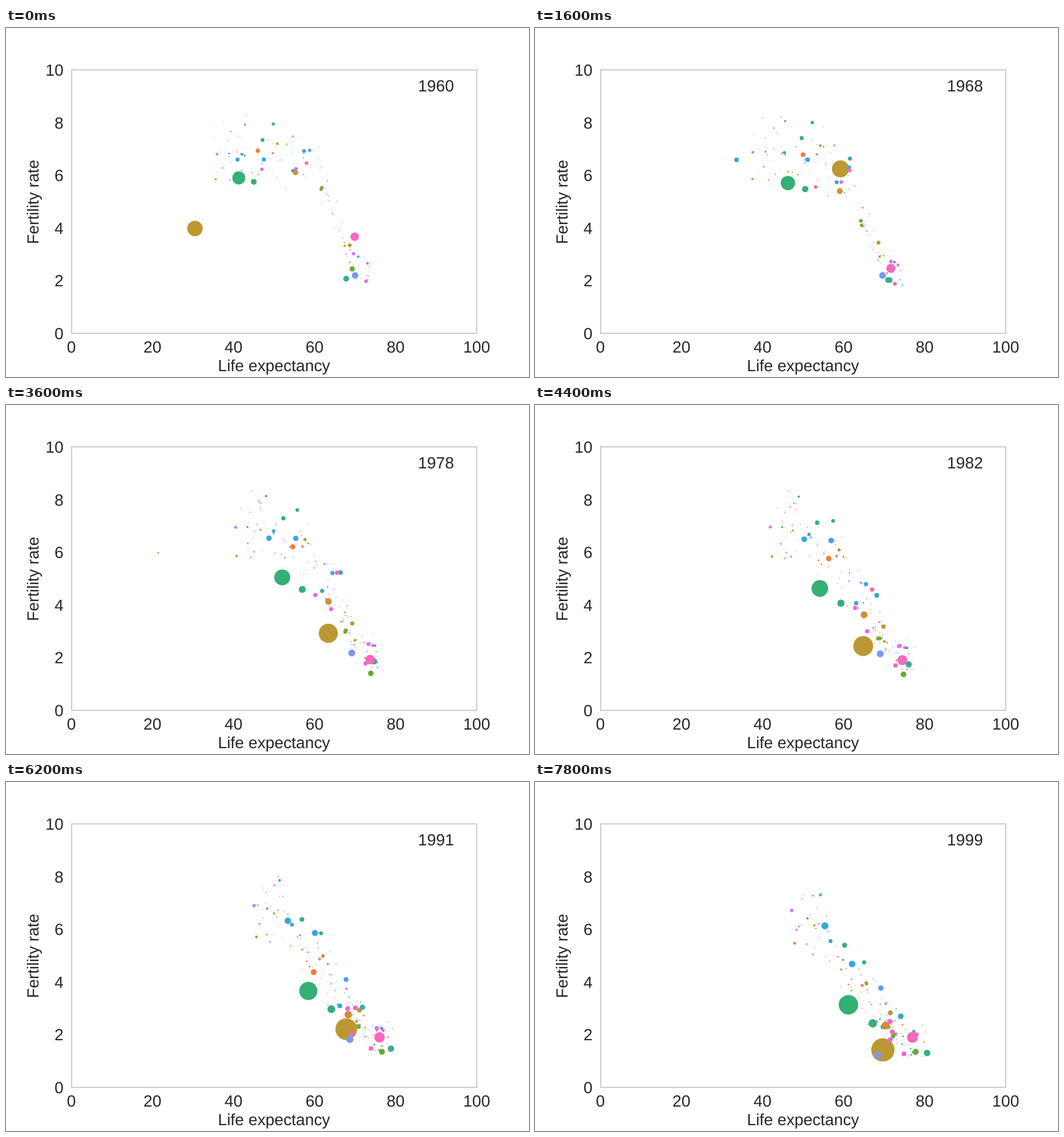
An HTML page that plays this animation: 900x600 px, repeating every 8 s.

```html
<!DOCTYPE html>
<html lang="en">
<head>
<meta charset="utf-8">
<title>Life expectancy and fertility rate</title>
<style>
  html, body { margin: 0; width: 100%; height: 100%; overflow: hidden; background: #fff; }
  svg { display: block; width: 900px; height: 600px; }
  text {
    font: 27.78px "Liberation Sans", Arial, sans-serif;
    fill: #262626;
    text-anchor: middle;
    text-rendering: geometricPrecision;
  }
  .y-tick { text-anchor: end; }
</style>
</head>
<body>
<svg viewBox="0 0 900 600">
  <g id="dots"></g>
  <rect x="113" y="72" width="697" height="453" fill="none" stroke="#ccc" stroke-width="2"/>
  <g id="ticks"></g>
  <text x="461.2" y="590">Life expectancy</text>
  <text transform="translate(56 299) rotate(-90)">Fertility rate</text>
  <text id="year" x="740" y="109">1960</text>
</svg>
<script>
const FIRST_YEAR = 1960, YEARS = 40, STEP = 200;
const PALETTE = ['#f77189', '#ee7f32', '#dc8932', '#c39532', '#ae9d31', '#77ab31', '#33b07a',
  '#35ae93', '#36ada4', '#38a9c5', '#3aa3ea', '#6e9bf4', '#a48cf4', '#cc7af4', '#f45deb', '#f565cc', '#f66bad'];
const dots = [];

const px = life => 112.5 + 6.975 * life;
const py = rate => 525 - 45.3 * rate;
const mix = (a, b, k) => a + (b - a) * k;
const fall = (x, middle, width) => 1 / (1 + Math.exp((x - middle) / width));
const bump = (x, middle, width) => Math.exp(-(((x - middle) / width) ** 2));
const progress = year => year / (YEARS - 1);

function make(parent, tag, attrs, label = '') {
  const node = document.createElementNS('http://www.w3.org/2000/svg', tag);
  for (const name in attrs) node.setAttribute(name, attrs[name]);
  node.textContent = label;
  return document.getElementById(parent).appendChild(node);
}

// place(year) returns [life expectancy, fertility rate]
function addDot(color, radius, growth, place) {
  dots.push({ node: make('dots', 'circle', { fill: color }), radius, growth, place });
}

// Life rises along an ease-out, fertility drops along an S-curve; events bend both for a while
function addCountry(color, radius, [life0, life1], [high, low, middle, width = 7], ...events) {
  const growth = 0.9 + 0.0675 * (high + low);
  addDot(color, radius, growth, year => {
    let life = mix(life0, life1, 1 - (1 - progress(year)) ** 1.25);
    let rate = mix(low, high, fall(year, middle, width));
    for (const { at, span, life: dLife = 0, rate: dRate = 0 } of events) {
      const strength = bump(year, at, span);
      life += dLife * strength;
      rate += dRate * strength;
    }
    return [life, rate];
  });
}

let seed = 1973;
function random() {
  seed = (seed * 16807) % 2147483647;
  return seed / 2147483647;
}

// Fertility by life expectancy: a steep S-curve that flattens out over the decades
function typicalRate(life, k) {
  const drop = fall(life, mix(65, 63, k), mix(2.3, 6.3, k));
  return mix(mix(2.3, 1.2, k), mix(6.75, 7.1, k), drop);
}

function addSmallDots(count) {
  for (let i = 0; i < count; i++) {
    const start = random() < 0.66 ? 35 + 28 * random() : 62 + 12 * random();
    const gain = 4.5 + 9 * fall(start, 62, 4) + 7 * (random() - 0.5);
    const spread = random() + random() - 1, phase = 2 * Math.PI * random();
    const radius = 0.6 + 2.6 * random() ** 3.5;
    const color = PALETTE[Math.floor(i / count * PALETTE.length)];
    addDot(color, radius, 1.35, year => {
      const k = progress(year);
      const life = start + gain * k + 0.6 * Math.sin(phase + year / 7);
      const rate = typicalRate(life, k);
      return [life, rate + spread * (mix(0.2, 0.6, k) + 0.18 * rate)];
    });
  }
}

addSmallDots(122);

addCountry('#ee8032', 3.6, [46, 62], [7, 2.4, 29]);
addCountry('#d58c32', 4.6, [55.3, 70.4], [6.8, 2, 16, 9]);
addCountry('#cb9132', 1.2, [42, 59.4], [6.2, 3.5, 35],
  { at: 17.3, span: 3.7, life: -31 });
addCountry('#bb9832', 13.3, [56, 69.7], [6.7, 2.3, 13.5, 2.5],
  { at: 0, span: 3.6, life: -25.5, rate: -2.7 },
  { at: 40, span: 6, rate: -0.9 });
addCountry('#65ad31', 4.5, [69.3, 77.8], [2.5, 1.35, 9, 3]);
addCountry('#33b074', 11.2, [41.3, 61.2], [6, 2.8, 24]);
addCountry('#34b07a', 5, [45, 67.2], [5.9, 2.1, 22.5]);
addCountry('#35ae8e', 5, [67.8, 80.6], [2.1, 1.2, 25]);
addCountry('#37abb2', 3.2, [57.4, 74.1], [7, 2.6, 20, 5]);
addCountry('#39a7d6', 3.5, [41, 55.4], [6.6, 5.9, 34],
  { at: 8, span: 2.5, life: -11 });
addCountry('#3ba3e8', 3.6, [47.5, 62.1], [6.6, 3.4, 37, 5]);
addCountry('#4d9ff3', 2.8, [58.8, 69.2], [7.6, 3.5, 15, 9]);
addCountry('#7d98f4', 5.7, [70, 68.5], [2.2, 0.9, 34.5, 4]);
addCountry('#8d93f4', 0.9, [43, 49], [8.3, 5.3, 32],
  { at: 34, span: 1.8, life: -35 });
addCountry('#f45de4', 2.8, [55.4, 71.5], [6.4, 1.75, 17, 5]);
addCountry('#f561dd', 2.8, [47, 71.5], [7, 2, 17, 10]);
addCountry('#f668bf', 7.3, [69.9, 77], [4, 1.9, 5, 3]);
addCountry('#f66bae', 3, [58, 72], [6.6, 1.5, 25]);

for (let i = 0; i <= 5; i++) {
  make('ticks', 'text', { x: px(20 * i), y: 558 }, 20 * i);
  make('ticks', 'text', { x: 99, y: py(2 * i) + 10, class: 'y-tick' }, 2 * i);
}

const yearLabel = document.getElementById('year');
let shown = -1;

function draw(now) {
  const year = Math.floor(now / STEP) % YEARS;
  if (year === shown) return;
  shown = year;
  yearLabel.textContent = FIRST_YEAR + year;
  for (const { node, radius, growth, place } of dots) {
    const [life, rate] = place(year);
    node.setAttribute('cx', px(life));
    node.setAttribute('cy', py(rate));
    node.setAttribute('r', radius * mix(1, growth, progress(year)));
  }
}

let began;
function tick(now) {
  began ??= now;
  draw(now - began);
  requestAnimationFrame(tick);
}
draw(0);
requestAnimationFrame(tick);
</script>
</body>
</html>
```
